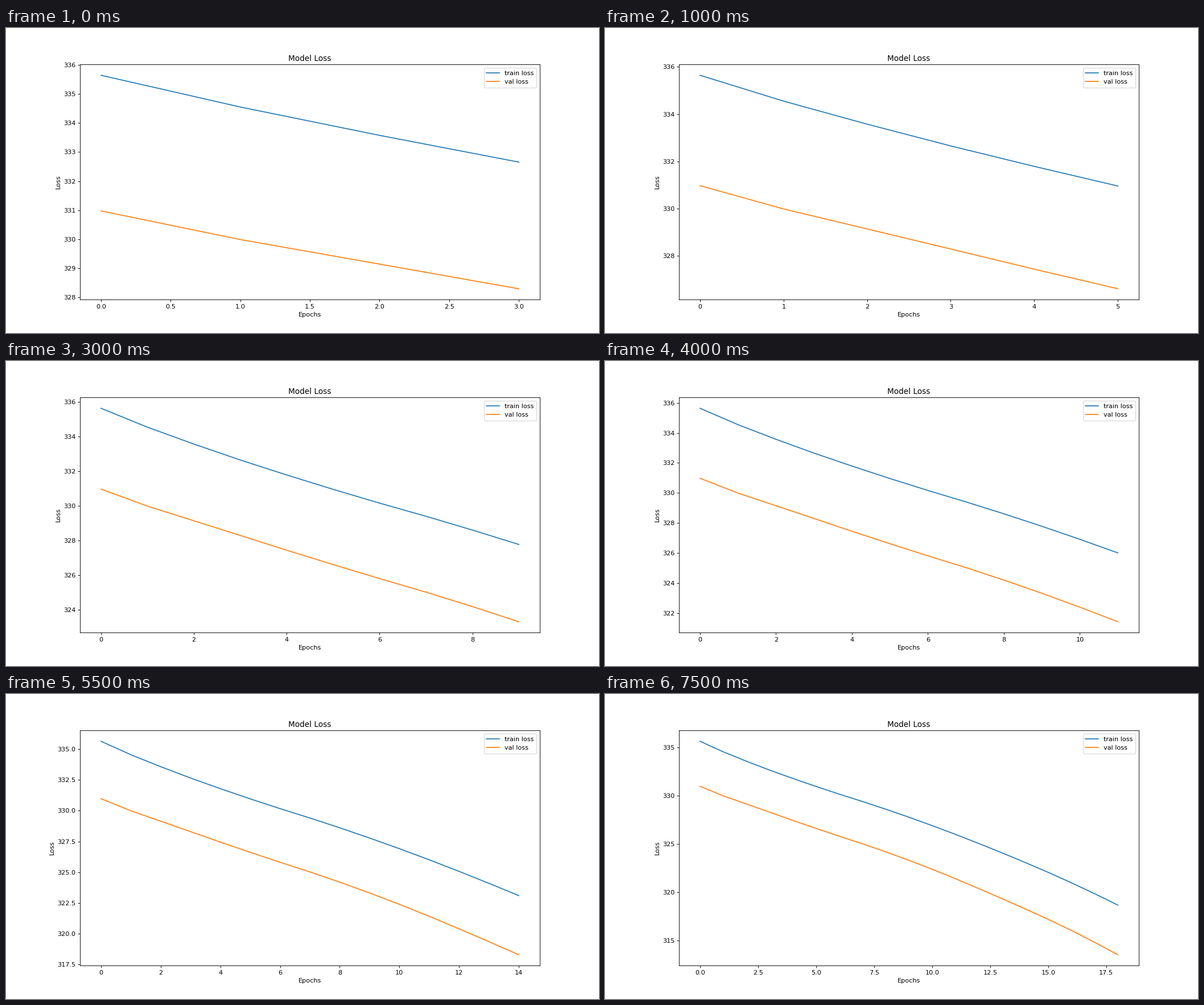
Write a matplotlib script that moves like this. It is 1042 px wide and 537 px high and loops after 8000 ms.

```python
import numpy as np
import matplotlib.pyplot as plt
from matplotlib.animation import FuncAnimation

WIDTH, HEIGHT = 1042, 537
DPI = WIDTH / 12.8
FRAMES = 16
INTERVAL = 500
FIRST_EPOCH = 3
LAST_EPOCH = FIRST_EPOCH + FRAMES - 1

# Epochs at which the speed of the loss decrease changes
KNOTS = [0, 1, 3, 6, 11, 14, 17]


def losses(start, rates):
    """Sum up the drop per epoch, interpolated between the knots."""
    drops = np.interp(np.arange(LAST_EPOCH), KNOTS, rates)
    return start - np.append(0, np.cumsum(drops))


train = losses(335.642, [1.092, 0.975, 0.865, 0.76, 0.94, 1.03, 1.18])
val = losses(330.975, [0.985, 0.845, 0.852, 0.785, 1.02, 1.085, 1.295])

fig, ax = plt.subplots(figsize=(WIDTH / DPI, HEIGHT / DPI), dpi=DPI)


def draw(frame):
    """Plot both loss histories up to the current epoch."""
    count = FIRST_EPOCH + frame + 1
    ax.clear()
    ax.plot(train[:count], label="train loss")
    ax.plot(val[:count], label="val loss")
    ax.set_title("Model Loss")
    ax.set_xlabel("Epochs")
    ax.set_ylabel("Loss")
    ax.legend(loc="upper right")
    return ax.lines


anim = FuncAnimation(fig, draw, frames=FRAMES, interval=INTERVAL,
                     repeat=True, repeat_delay=0, blit=False)
plt.show()
```
